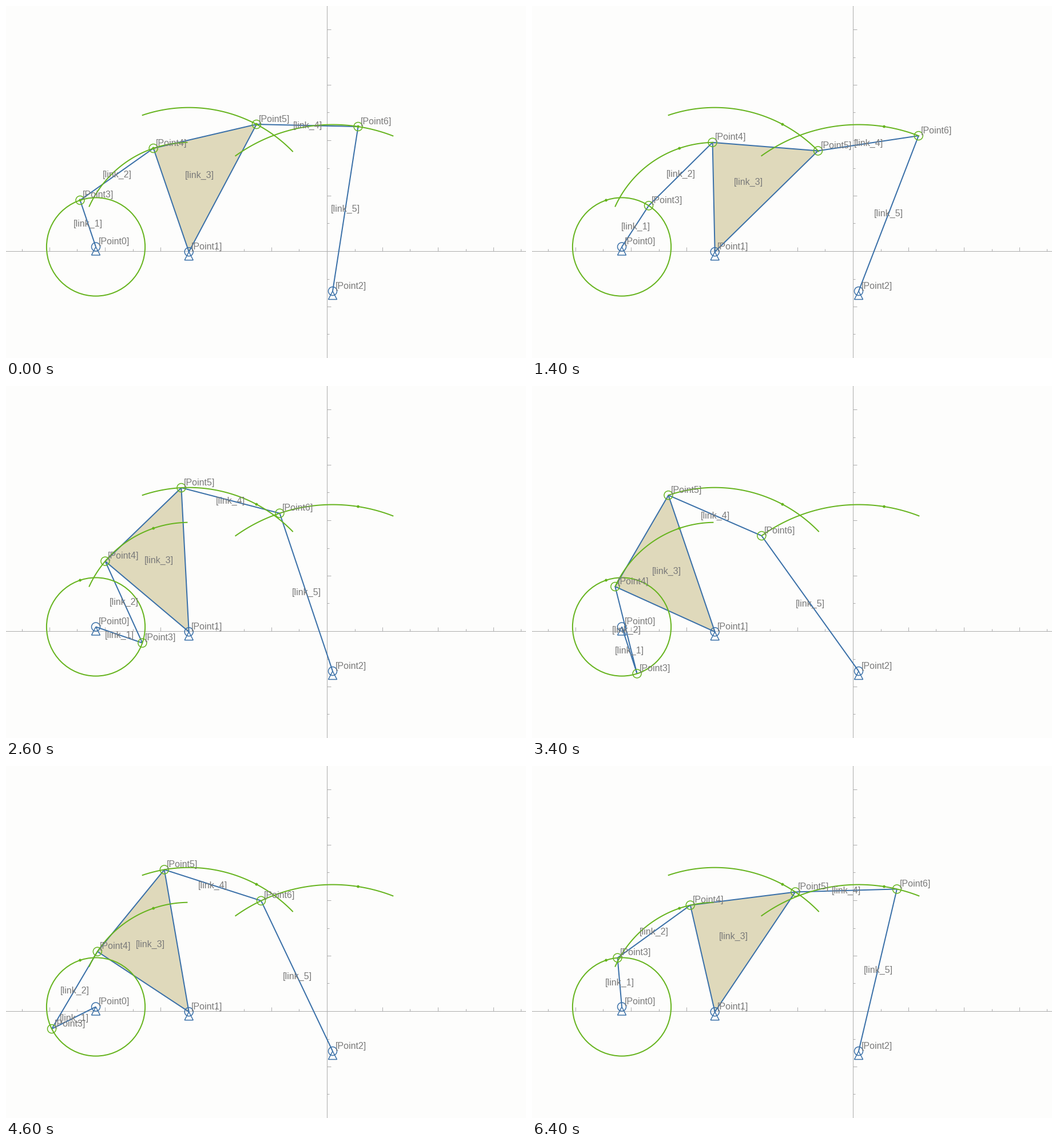
A matplotlib script for the animation above (6.5 s loop, 909 px wide and 616 px high).

```python
import numpy as np
import matplotlib.pyplot as plt
from matplotlib.animation import FuncAnimation
from matplotlib.patches import Circle, Polygon

W, H, DPI = 909, 616, 100
FRAMES, STEP = 65, 100
PX = 72 / DPI

PAPER, AXIS, TEXT = "#fdfdfc", "#adadad", "#7a7a7a"
BLUE, GREEN, TAN = "#3a70a8", "#66b41e", "#dfd9bb"

# Fixed pivots and link lengths, in pixels with y pointing down
P0 = np.array([157.0, 421.5])
P1 = np.array([319.7, 430.2])
P2 = np.array([571.0, 499.0])
CRANK, ROD, ARM_IN, ARM_OUT, COUPLER, ROCKER = 86.1, 157.1, 191.5, 252.5, 177.7, 291.4
SPREAD = np.radians(46.8)

# Crank angle in degrees over time in ms
TIMES = [0, 650, 900, 1400, 2600, 3400, 3700, 4400, 4600, 5700, 6400]
ANGLES = [108.6, 108.6, 92.5, 56.9, -19.1, -72, -90, -141.3, -153.4, -223.8, -265]


def polar(center, radius, angle):
    return center + radius * np.array([np.cos(angle), -np.sin(angle)])


def heading(center, point):
    return np.arctan2(center[1] - point[1], point[0] - center[0])


def join(a, ra, b, rb):
    """Point at distance ra from a and rb from b, on the upper side."""
    d = b - a
    dist = np.hypot(*d)
    along = (ra**2 - rb**2 + dist**2) / (2 * dist)
    off = np.sqrt(max(ra**2 - along**2, 0))
    return a + (d * along + np.array([d[1], -d[0]]) * off) / dist


def solve(degrees):
    p3 = polar(P0, CRANK, np.radians(degrees))
    p4 = join(p3, ROD, P1, ARM_IN)
    p5 = polar(P1, ARM_OUT, heading(P1, p4) - SPREAD)
    p6 = join(p5, COUPLER, P2, ROCKER)
    return p3, p4, p5, p6


fig = plt.figure(figsize=(W / DPI, H / DPI), dpi=DPI, facecolor=PAPER)
ax = fig.add_axes([0, 0, 1, 1])
ax.set_xlim(0, W)
ax.set_ylim(H, 0)
ax.axis("off")


def stroke(xs, ys, color, width, z):
    return ax.plot(xs, ys, color=color, lw=width * PX, zorder=z,
                   solid_capstyle="butt", solid_joinstyle="round")[0]


def ring(center, color):
    return ax.add_patch(Circle(center, 7.5, fill=False, ec=color, lw=1.5 * PX, zorder=5))


def label(name):
    return ax.text(0, 0, f"[{name}]", family="Liberation Sans", fontsize=16 * PX,
                   color=TEXT, va="baseline", zorder=6)


def draw_axes():
    ox, oy, gap = 561, 429, 48.5
    stroke([-1, W], [oy, oy], AXIS, 1, 1)
    stroke([ox, ox], [-1, H], AXIS, 1, 1)
    for k in range(-11, 9):
        size = 4 if k % 2 else 7
        x, y = round(ox + k * gap), round(oy + k * gap)
        if k:
            stroke([x, x], [oy, oy - size], AXIS, 1, 1)
            stroke([ox, ox + size], [y, y], AXIS, 1, 1)


def draw_paths():
    ax.add_patch(Circle(P0, CRANK, fill=False, ec=GREEN, lw=2 * PX, zorder=4))
    poses = [solve(a) for a in range(360)]
    for i, pivot, radius in ((1, P1, ARM_IN), (2, P1, ARM_OUT), (3, P2, ROCKER)):
        swing = [heading(pivot, pose[i]) for pose in poses]
        arc = np.array([polar(pivot, radius, a)
                        for a in np.linspace(min(swing), max(swing), 120)])
        stroke(arc[:, 0], arc[:, 1], GREEN, 2, 4)
    for p in solve(ANGLES[0]):
        ax.add_patch(Circle(p, 2.4, fc=GREEN, ec="none", zorder=4))


def draw_pivots():
    for p in (P0, P1, P2):
        ring(p, BLUE)
        corners = p + np.array([[0, 0], [-7.5, 14.5], [7.5, 14.5]])
        ax.add_patch(Polygon(corners, fill=False, ec=BLUE, lw=1.5 * PX, zorder=5))


draw_axes()
draw_paths()
draw_pivots()

plate = ax.add_patch(Polygon([P1, P1, P1], fc=TAN, ec=BLUE, lw=2 * PX,
                             joinstyle="round", zorder=2))
bars = [stroke([], [], BLUE, 2, 3) for _ in range(4)]
joints = [ring(P0, GREEN) for _ in range(4)]
point_labels = [label(f"Point{i}") for i in range(7)]
link_labels = [label(f"link_{i}") for i in range(1, 6)]
for t in link_labels:
    t.set_ha("center")


def update(i):
    p3, p4, p5, p6 = solve(np.interp(i * STEP, TIMES, ANGLES))
    links = [(P0, p3), (p3, p4), (P1, p4, p5), (p5, p6), (p6, P2)]
    plate.set_xy(links[2])
    for bar, ends in zip(bars, links[:2] + links[3:]):
        bar.set_data(*np.transpose(ends))
    for joint, p in zip(joints, (p3, p4, p5, p6)):
        joint.center = p
    for t, p in zip(point_labels, (P0, P1, P2, p3, p4, p5, p6)):
        t.set_position((p[0] + 4.5, p[1] - 4.5))
    for t, ends in zip(link_labels, links):
        t.set_position(np.mean(ends, axis=0) + (0.5, 5))
    return [plate, *bars, *joints, *point_labels, *link_labels]


anim = FuncAnimation(fig, update, frames=FRAMES, interval=STEP, repeat=True,
                     repeat_delay=0, blit=False)
plt.show()
```
